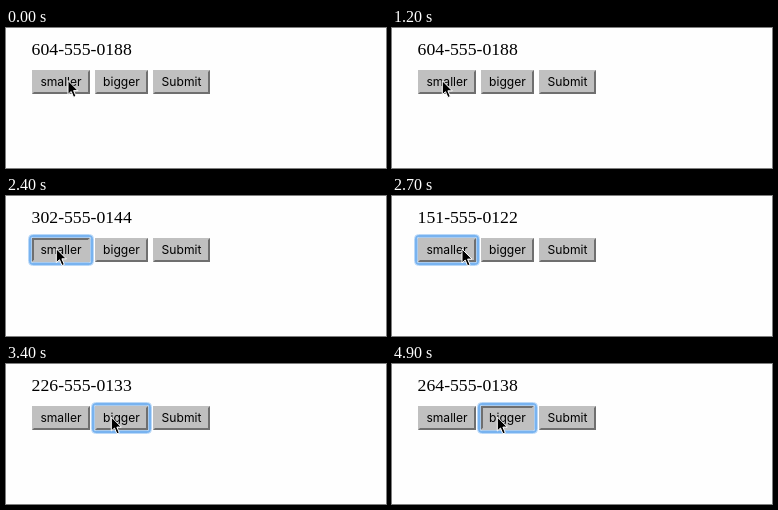
An HTML page that plays this animation: 380x140 px, repeating every 5 s.

```html
<!DOCTYPE html>
<html lang="en">
<head>
<meta charset="utf-8">
<title>Number guesser</title>
<style>
  html, body { margin: 0; width: 100%; height: 100%; overflow: hidden; background: #fefefe; }
  svg { display: block; }
  .number { font: 17.7px "Liberation Serif", serif; }
  .label { font: 12.1px Inter, sans-serif; text-anchor: middle; }
</style>
</head>
<body>
<svg id="stage" width="380" height="140" viewBox="0 0 380 140">
  <text id="number" class="number" x="25.6" y="27"></text>
  <g id="buttons"></g>
  <g id="ring" fill="none">
    <rect id="glow" rx="4" stroke="#b9d8f8" stroke-width="1"/>
    <rect id="halo" rx="3" stroke="#78b3f0" stroke-width="2"/>
    <rect id="rim" rx="1" stroke="#a9cbee" stroke-width="1"/>
  </g>
  <path id="cursor" d="M0 0V14L3.2 11L5.6 16.8L8 15.8L5.6 10.1H10Z"
        fill="#000" stroke="#fff" stroke-width="1" stroke-linejoin="round"/>
</svg>
<script>
const LOOP = 5000;
const FACE = "#c0c0c0", SHADE = "#6f6f6f";
const TOP = 42, HEIGHT = 24;
const $ = id => document.getElementById(id);

const buttons = [
  { label: "smaller", x: 26, width: 58 },
  { label: "bigger", x: 89, width: 53 },
  { label: "Submit", x: 147, width: 57 }
];

// Each track is a list of [start time, value], held until the next entry.
const numbers = [
  [0, "604-555-0188"], [1600, "302-555-0144"], [2500, "151-555-0122"],
  [3400, "226-555-0133"], [4200, "264-555-0138"]
];
const focus = [[0, -1], [1500, 0], [3300, 1]];
const pressed = [
  [0, -1], [1500, 0], [1600, -1], [2400, 0], [2500, -1],
  [3300, 1], [3400, -1], [4900, 1]
];
const pointer = [
  [0, [62, 52.5]], [900, [58, 53]], [1100, [53, 53]], [1200, [50.3, 52.7]],
  [2700, [70, 53]], [2800, [102, 53]], [3000, [105.3, 53]]
];

const valueAt = (track, time) => track.findLast(([start]) => start <= time)[1];

function add(parent, tag, attributes) {
  const node = document.createElementNS("http://www.w3.org/2000/svg", tag);
  setAll(node, attributes);
  return parent.appendChild(node);
}

function setAll(node, attributes) {
  for (const name in attributes) node.setAttribute(name, attributes[name]);
}

function buildButton(button) {
  const { x, width: w, label } = button;
  const h = HEIGHT;
  const group = add($("buttons"), "g", { transform: `translate(${x} ${TOP})` });
  add(group, "rect", { width: w, height: h, fill: FACE });
  button.light = add(group, "path", { d: `M0 ${h}V0H${w}L${w - 2} 2H2V${h - 2}Z` });
  button.dark = add(group, "path", { d: `M0 ${h}H${w}V0L${w - 2} 2V${h - 2}H2Z` });
  add(group, "text", { class: "label", x: w / 2, y: 16 }).textContent = label;
}

function outline(node, button, gap) {
  setAll(node, {
    x: button.x - gap, y: TOP - gap,
    width: button.width + 2 * gap, height: HEIGHT + 2 * gap
  });
}

function draw(time) {
  $("number").textContent = valueAt(numbers, time);
  const down = valueAt(pressed, time);
  buttons.forEach((button, i) => {
    button.light.setAttribute("fill", i === down ? SHADE : FACE);
    button.dark.setAttribute("fill", i === down ? FACE : SHADE);
  });

  const focused = buttons[valueAt(focus, time)];
  $("ring").style.display = focused ? "" : "none";
  if (focused) {
    outline($("rim"), focused, 0.5);
    outline($("halo"), focused, 2);
    outline($("glow"), focused, 3.5);
  }
  $("cursor").setAttribute("transform", `translate(${valueAt(pointer, time)})`);
}

buttons.forEach(buildButton);
const begin = performance.now();
function tick() {
  draw((performance.now() - begin) % LOOP);
  requestAnimationFrame(tick);
}
tick();
</script>
</body>
</html>
```
